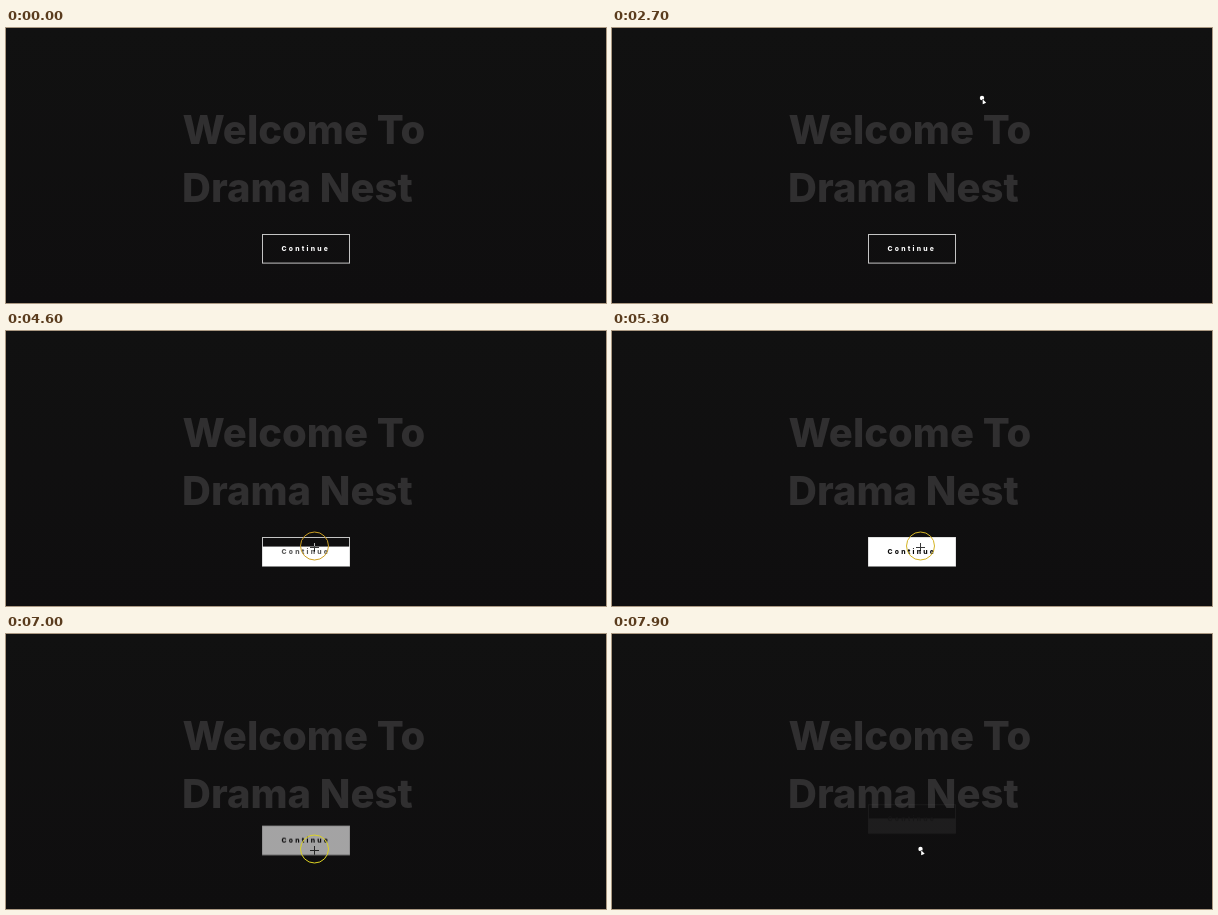
These frames come from a looping animation (600 px wide and 275 px high, 8000 ms). An HTML page with a canvas:

```html
<!DOCTYPE html>
<html lang="en">
<head>
<meta charset="utf-8">
<title>Welcome</title>
<style>
  html, body { margin: 0; width: 100%; height: 100%; overflow: hidden; background: #101010; }
  canvas { display: block; width: 600px; height: 275px; }
</style>
</head>
<body>
<canvas id="stage"></canvas>
<script>
const W = 600, H = 275, LOOP = 8000, STEP = 100;
const BTN = { x: 256, y: 206, w: 88, h: 29.6 };
const RISE = 38;
const dpr = window.devicePixelRatio || 1;

function setup(canvas) {
  canvas.width = W * dpr;
  canvas.height = H * dpr;
  const c = canvas.getContext('2d');
  c.scale(dpr, dpr);
  return c;
}
const ctx = setup(document.getElementById('stage'));
const layer = document.createElement('canvas');
const btn = setup(layer);

// Pointer stops; the optional curve holds Bezier handles leading to the next stop
const stops = [
  { t: 400, x: 235, y: 14 },
  { t: 900, x: 215, y: 40 },
  { t: 1200, x: 215, y: 40, curve: { x: [-75, 515], y: [340, 195] } },
  { t: 2100, x: 320, y: 70 },
  { t: 2700, x: 370, y: 70 },
  { t: 2800, x: 370, y: 70 },
  { t: 3700, x: 308.5, y: 196 },
  { t: 4300, x: 308.5, y: 215 }
];

const clamp = v => Math.min(1, Math.max(0, v));
const mix = (a, b, p) => a + (b - a) * p;
const bezier = (a, b, c, d, p) => {
  const q = 1 - p;
  return a * q ** 3 + 3 * b * p * q * q + 3 * c * p * p * q + d * p ** 3;
};

// Same curve as the CSS keyword "ease"
function ease(p) {
  let lo = 0, hi = 1;
  for (let i = 0; i < 24; i++) {
    const mid = (lo + hi) / 2;
    if (bezier(0, .25, .25, 1, mid) < p) lo = mid; else hi = mid;
  }
  return bezier(0, .1, 1, 1, lo);
}

function tween(t, start, length) {
  const p = clamp((t - start) / length);
  return p === 0 || p === 1 ? p : ease(p);
}

function pointerAt(t) {
  const i = stops.findIndex(s => s.t > t);
  if (i < 0) return stops[stops.length - 1];
  const a = stops[i - 1], b = stops[i], p = (t - a.t) / (b.t - a.t);
  const along = k => a.curve ? bezier(a[k], ...a.curve[k], b[k], p) : mix(a[k], b[k], p);
  return { x: along('x'), y: along('y') };
}

function drawBackground() {
  const g = ctx.createLinearGradient(0, 0, 0, H);
  g.addColorStop(0, '#111111');
  g.addColorStop(1, '#0f0e0f');
  ctx.fillStyle = g;
  ctx.fillRect(0, 0, W, H);
  ctx.fillStyle = '#302f30';
  ctx.font = '800 40px Inter, sans-serif';
  ctx.fillText('Welcome To', 176.5, 115.5);
  ctx.fillText('Drama Nest', 176, 174);
}

function drawButton(t) {
  const { x, y, w, h } = BTN;
  const fill = tween(t, 4200, 1000) * (1 - tween(t, 7350, 1940));
  const leave = tween(t, 6540, 1940);

  // Drawn on its own layer so that it fades as one piece
  btn.clearRect(0, 0, W, H);
  btn.strokeStyle = '#c4c4c4';
  btn.strokeRect(x + .5, y + .5, w - 1, h - 1);
  const inner = (h - 1) * fill;
  btn.fillStyle = '#fff';
  btn.fillRect(x + .5, y + h - .5 - inner, w - 1, inner);
  const shade = mix(255, 10, fill);
  btn.fillStyle = `rgb(${shade},${shade},${shade})`;
  btn.font = '800 6.8px Inter, sans-serif';
  btn.letterSpacing = '2.2px';
  btn.fillText('Continue', 275.6, 223.2);

  ctx.globalAlpha = 1 - leave;
  ctx.drawImage(layer, 0, -RISE * leave, W, H);
  ctx.globalAlpha = 1;
}

function drawArrow(x, y) {
  ctx.beginPath();
  ctx.moveTo(x, y);
  ctx.lineTo(x, y + 5);
  ctx.lineTo(x + 3.5, y + 3.5);
  ctx.closePath();
  ctx.strokeStyle = '#111';
  ctx.lineWidth = .8;
  ctx.stroke();
  ctx.fillStyle = '#fff';
  ctx.fill();
}

function drawCross(x, y) {
  ctx.globalCompositeOperation = 'difference';
  ctx.fillStyle = '#c8c8c8';
  ctx.fillRect(x - 4, y, 9, 1);
  ctx.fillRect(x, y - 4, 1, 4);
  ctx.fillRect(x, y + 1, 1, 4);
  ctx.globalCompositeOperation = 'source-over';
}

function drawPointer(t) {
  if (t < stops[0].t) return;
  const { x, y } = pointerAt(t);
  const grow = tween(t, 4100, 400) * (1 - tween(t, 7250, 400));
  const hover = t >= 4200 && t < 7300;

  ctx.beginPath();
  ctx.arc(x, y, mix(2.2, 14, grow), 0, 2 * Math.PI);
  ctx.fillStyle = `rgba(255,255,255,${(1 - grow) ** 2})`;
  ctx.fill();
  const p = clamp((t - 4600) / 1800);
  ctx.strokeStyle = `rgba(${mix(205, 222, p)},${mix(160, 212, p)},35,${grow})`;
  ctx.lineWidth = 1;
  ctx.stroke();

  if (hover) drawCross(Math.floor(x), Math.floor(y) + 1);
  else drawArrow(x + .7, y + 1.2);
}

function frame(now) {
  const t = Math.floor((now % LOOP) / STEP) * STEP;
  drawBackground();
  drawButton(t);
  drawPointer(t);
  requestAnimationFrame(frame);
}
requestAnimationFrame(frame);
</script>
</body>
</html>
```
